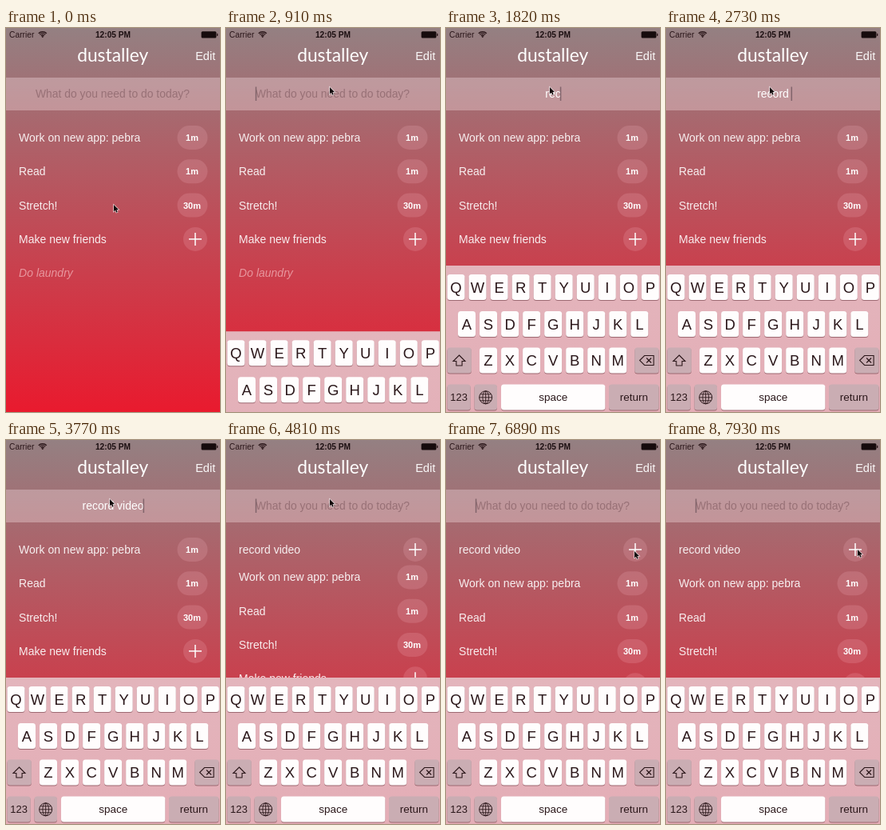
Write an HTML page with a canvas that moves like this. It is 268 px wide and 480 px high and loops after 8000 ms.

```html
<!DOCTYPE html>
<html lang="en">
<head>
<meta charset="utf-8">
<title>To-do list</title>
<style>
  html, body { margin: 0; width: 100%; height: 100%; overflow: hidden; background: #94807f; }
  canvas { display: block; width: 268px; height: 480px; }
</style>
</head>
<body>
<canvas id="stage"></canvas>
<script>
const W = 268, H = 480, LOOP = 8000, STEP = 130;
const SANS = '"Liberation Sans", Arial, sans-serif';
const INK = '#2b171a';
const KEYBOARD_TOP = 297, ROW_Y = 137, PITCH = 42.3, KEY_PITCH = 27.04;
const FOCUS = 850, SUBMIT = 4590;
const TYPED = 'record video';
const KEY_TIMES = [1560, 1690, 1820, 2000, 2160, 2340, 2600, 2860, 3000, 3200, 3380, 3640];
const POINTER = [
  [0, 135, 221], [130, 135, 216], [650, 130, 74], [5200, 130, 74],
  [5850, 127, 113], [6500, 236, 139], [7280, 236, 139], [7800, 240, 137]
];
const TASKS = [
  { name: 'Work on new app: pebra', time: '1m' },
  { name: 'Read', time: '1m' },
  { name: 'Stretch!', time: '30m' },
  { name: 'Make new friends' },
  { name: 'Do laundry', done: true }
];

const canvas = document.getElementById('stage');
const ctx = canvas.getContext('2d');
const scale = window.devicePixelRatio || 1;
canvas.width = Math.round(W * scale);
canvas.height = Math.round(H * scale);

const clamp = x => Math.min(1, Math.max(0, x));
const smooth = x => x * x * (3 - 2 * x);

function text(str, x, y, size, color, align = 'left', style = '', family = SANS) {
  ctx.font = `${style} ${size}px ${family}`;
  ctx.textAlign = align;
  ctx.fillStyle = color;
  ctx.fillText(str, x, y);
}

function box(x, y, w, h, r, color) {
  ctx.beginPath();
  ctx.roundRect(x, y, w, h, r);
  ctx.fillStyle = color;
  ctx.fill();
}

function line(points, color, width, close = false) {
  ctx.beginPath();
  points.forEach(([x, y]) => ctx.lineTo(x, y));
  if (close) ctx.closePath();
  ctx.strokeStyle = color;
  ctx.lineWidth = width;
  ctx.stroke();
}

function arc(x, y, r, from, to, color, width) {
  ctx.beginPath();
  ctx.arc(x, y, r, from, to);
  ctx.strokeStyle = color;
  ctx.lineWidth = width;
  ctx.stroke();
}

function background() {
  const g = ctx.createLinearGradient(0, 0, 0, H);
  g.addColorStop(0, 'rgb(148,128,130)');
  g.addColorStop(1, 'rgb(233,26,46)');
  ctx.fillStyle = g;
  ctx.fillRect(0, 0, W, H);
}

function header() {
  text('Carrier', 4, 12, 10.3, INK);
  for (const r of [2.6, 4.9, 7.1]) arc(45.8, 11.8, r, -Math.PI * 0.75, -Math.PI * 0.25, INK, 1.4);
  box(44.8, 10, 2, 2, 1, INK);
  text('12:05 PM', 134, 12, 10.2, '#1c0f11', 'center', 'bold');
  box(244.6, 4.2, 18.8, 8.2, 1.5, '#160b0d');
  box(264, 6.8, 1.3, 3.2, 0.6, INK);
  text('dustalley', 133.7, 42, 22.8, '#fff', 'center', '400', 'Lato, sans-serif');
  text('Edit', 237.2, 40, 14.5, 'rgba(255,255,255,0.95)');
}

function caretAlpha(t, reset) {
  const p = (t - reset) % 1040;
  if (p < 520) return 1;
  return p < 780 ? clamp(1 - (p - 520) / 130) : clamp((p - 910) / 130);
}

function field(t) {
  ctx.fillStyle = 'rgba(255,235,238,0.32)';
  ctx.fillRect(0, 62, W, 41);
  const count = t < SUBMIT ? KEY_TIMES.filter(k => k <= t).length : 0;
  let caretX = 37.5;
  if (count) {
    const str = TYPED.slice(0, count);
    text(str.trimEnd(), 134, 87, 14, '#fff', 'center');
    const half = ctx.measureText(str.trimEnd()).width / 2;
    caretX = 133.8 + half + (str.endsWith(' ') ? 3.6 : 0);
  } else {
    text('What do you need to do today?', 133.5, 87, 13.9, 'rgba(112,76,82,0.5)', 'center');
  }
  if (t < FOCUS) return;
  const reset = t >= SUBMIT ? SUBMIT : count ? KEY_TIMES[count - 1] : FOCUS + 60;
  ctx.globalAlpha = caretAlpha(t, reset);
  ctx.fillStyle = '#81646b';
  ctx.fillRect(caretX - 0.7, 73.5, 1.5, 17.5);
  ctx.globalAlpha = 1;
}

function row(task, y) {
  const style = task.done ? 'italic' : '';
  text(task.name, 16.1, y + 5, 14, task.done ? 'rgba(255,220,224,0.55)' : 'rgba(255,255,255,0.9)', 'left', style);
  if (task.done) return;
  const shade = 'rgba(255,195,208,0.17)';
  if (task.time) {
    box(214.5, y - 15, 38, 30, 15, shade);
    text(task.time, 233, y + 4, 11, '#fff', 'center', 'bold');
  } else {
    box(222, y - 15, 30, 30, 15, shade);
    line([[229, y], [245, y]], '#fff', 1.5);
    line([[237, y - 8], [237, y + 8]], '#fff', 1.5);
  }
}

function list(t) {
  const p = smooth(clamp((t - SUBMIT) / 304));
  if (p > 0) {
    ctx.globalAlpha = clamp(p * 1.3);
    row({ name: TYPED }, ROW_Y);
    ctx.globalAlpha = 1;
  }
  TASKS.forEach((task, i) => row(task, ROW_Y + (i + p) * PITCH));
}

function key(x, y, w, label, size, special) {
  box(x, y + 1, w, 32, 3.5, 'rgba(120,66,76,0.65)');
  box(x, y, w, 32, 3.5, special ? '#caadb3' : '#fffdfd');
  if (label) text(label, x + w / 2, y + 16 + size * 0.36, size, INK, 'center');
}

function letters(str, x, y) {
  [...str].forEach((c, i) => key(x + i * KEY_PITCH, y, 22, c, 18.5));
}

function shiftIcon(x, y) {
  const half = [[0, -7], [7.5, 0.5], [3.6, 0.5], [3.6, 6]];
  const mirror = half.slice(1).reverse().map(([a, b]) => [-a, b]);
  line([...half, ...mirror].map(([a, b]) => [x + a, y + b]), INK, 1.1, true);
}

function deleteIcon(x, y) {
  line([[-9, 0], [-3, -6], [8.5, -6], [8.5, 6], [-3, 6]].map(([a, b]) => [x + a, y + b]), INK, 1.1, true);
  line([[x - 0.5, y - 3], [x + 5.5, y + 3]], INK, 1.1);
  line([[x + 5.5, y - 3], [x - 0.5, y + 3]], INK, 1.1);
}

function globeIcon(x, y) {
  arc(x, y, 8, 0, 7, INK, 1);
  ctx.beginPath();
  ctx.ellipse(x, y, 3.8, 8, 0, 0, 7);
  ctx.lineWidth = 0.9;
  ctx.stroke();
  line([[x, y - 8], [x, y + 8]], INK, 0.9);
  for (const [dy, w] of [[-4, 6.9], [0, 8], [4, 6.9]]) line([[x - w, y + dy], [x + w, y + dy]], INK, 0.9);
}

function keyboard(t) {
  if (t < FOCUS) return;
  ctx.save();
  ctx.translate(0, 183 * Math.exp(-(t - FOCUS) / 75));
  const g = ctx.createLinearGradient(0, KEYBOARD_TOP, 0, H);
  g.addColorStop(0, '#e3b5bc');
  g.addColorStop(1, '#e4adb6');
  ctx.fillStyle = g;
  ctx.fillRect(0, KEYBOARD_TOP, W, H - KEYBOARD_TOP);
  letters('QWERTYUIOP', 1.5, 308);
  letters('ASDFGHJKL', 15, 354);
  letters('ZXCVBNM', 42, 399.5);
  key(1.5, 399.5, 30.4, '', 0, true);
  shiftIcon(16.5, 416);
  key(236.2, 399.5, 30.4, '', 0, true);
  deleteIcon(251.6, 415.5);
  key(1.5, 445.5, 29.3, '123', 13, true);
  key(35.5, 445.5, 28.5, '', 0, true);
  globeIcon(49.7, 461.8);
  key(69, 445.5, 130.4, 'space', 13.5);
  key(204, 445.5, 62.6, 'return', 13.5, true);
  ctx.restore();
}

function pointer(t) {
  let i = POINTER.length - 1;
  while (i > 0 && POINTER[i][0] > t) i--;
  const a = POINTER[i], b = POINTER[i + 1] || a;
  const p = b === a ? 0 : smooth(clamp((t - a[0]) / (b[0] - a[0])));
  const x = a[1] + (b[1] - a[1]) * p, y = a[2] + (b[2] - a[2]) * p;
  const shape = [[0, 0], [0, 8.4], [1.9, 6.7], [3.2, 9.7], [4.7, 9], [3.4, 6.2], [6, 6]];
  line(shape.map(([u, v]) => [x + u, y + v]), 'rgba(255,255,255,0.85)', 1.3, true);
  ctx.fillStyle = '#120a0b';
  ctx.fill();
}

function draw(now) {
  const t = Math.floor((now % LOOP) / STEP) * STEP;
  ctx.setTransform(scale, 0, 0, scale, 0, 0);
  background();
  header();
  field(t);
  list(t);
  keyboard(t);
  pointer(t);
}

let start;
function tick(now) {
  start ??= now;
  draw(now - start);
  requestAnimationFrame(tick);
}
draw(0);
requestAnimationFrame(tick);
</script>
</body>
</html>
```
